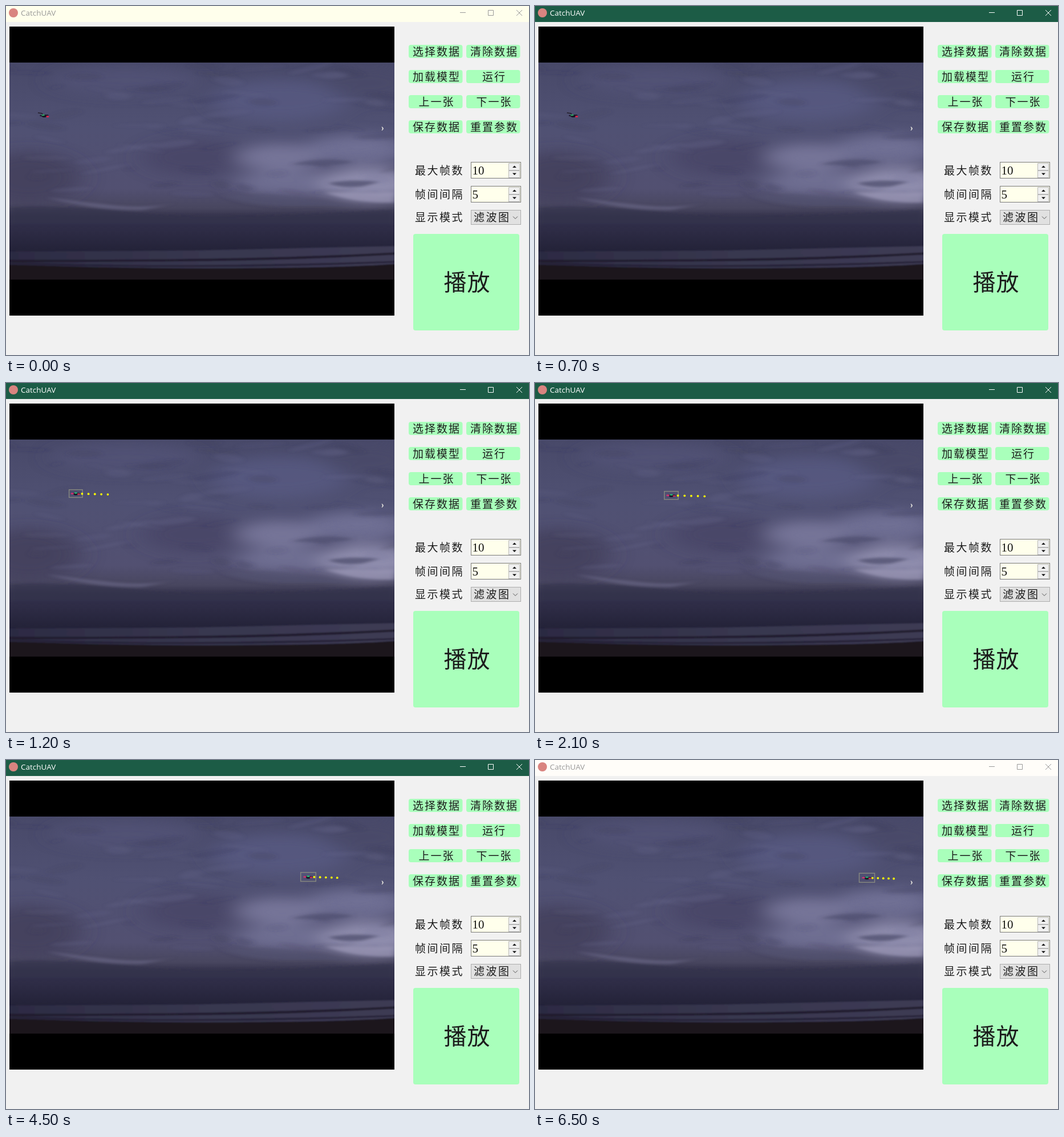
Write an HTML page that moves like this. It is 917 px wide and 611 px high and loops after 6.6 s.

```html
<!DOCTYPE html>
<html lang="zh-CN">
<head>
<meta charset="utf-8">
<title>CatchUAV</title>
<style>
html, body { margin: 0; width: 100%; height: 100%; overflow: hidden; background: #f1f1f1; }
svg { display: block; }
.cjk { font: 300 19px "Noto Sans CJK SC", "Noto Sans CJK", sans-serif; letter-spacing: 2px; fill: #1c1c1c; }
.label, .choice { letter-spacing: 2.5px; }
.mid { text-anchor: middle; }
.title { font: 13.5px "Open Sans", "Noto Sans", sans-serif; }
.num { font: 21px "Liberation Serif", serif; fill: #111; }
.play { font-size: 40px; letter-spacing: 1px; }
.btn { fill: #a9ffbb; }
</style>
</head>
<body>
<svg id="stage" width="917" height="611" viewBox="0 0 917 611">
  <defs>
    <linearGradient id="sky" x1="0" y1="0" x2="0" y2="1">
      <stop offset="0" stop-color="#484969"/>
      <stop offset=".3" stop-color="#505173"/>
      <stop offset=".58" stop-color="#525071"/>
      <stop offset=".67" stop-color="#48465f"/>
      <stop offset=".71" stop-color="#35334c"/>
      <stop offset=".76" stop-color="#2f2d47"/>
      <stop offset=".86" stop-color="#242339"/>
      <stop offset="1" stop-color="#242339"/>
    </linearGradient>
    <linearGradient id="sea" x1="0" y1="0" x2="1" y2="0">
      <stop offset="0" stop-color="#2c2b43"/>
      <stop offset=".5" stop-color="#38374f"/>
      <stop offset="1" stop-color="#3d3b54"/>
    </linearGradient>
    <filter id="soft" x="-50%" y="-50%" width="200%" height="200%"><feGaussianBlur stdDeviation="20 11"/></filter>
    <filter id="wisp" x="-50%" y="-50%" width="200%" height="200%"><feGaussianBlur stdDeviation="5 2"/></filter>
    <filter id="shore"><feGaussianBlur stdDeviation="1 .8"/></filter>
  </defs>

  <rect width="917" height="611" fill="#f1f1f1"/>
  <rect id="bar" width="917" height="28"/>
  <circle cx="13" cy="12" r="8" fill="#d98480"/>
  <text id="name" class="title" x="26" y="17">CatchUAV</text>
  <path id="controls" d="M796 11.5h10M845.5 7.5h9v9h-9zM895 7l10 10M905 7l-10 10" fill="none"/>

  <rect x="6" y="36" width="675" height="506"/>
  <svg x="6" y="99" width="675" height="380" viewBox="6 99 675 380">
    <rect x="6" y="99" width="675" height="380" fill="url(#sky)"/>
    <g filter="url(#soft)">
      <ellipse cx="40" cy="300" rx="90" ry="45" fill="#413f5b" opacity=".8"/>
      <ellipse cx="210" cy="130" rx="130" ry="24" fill="#55587c" opacity=".6"/>
      <ellipse cx="330" cy="265" rx="90" ry="32" fill="#464564" opacity=".7"/>
      <ellipse cx="480" cy="165" rx="120" ry="36" fill="#5b5d85" opacity=".7"/>
      <ellipse cx="635" cy="135" rx="80" ry="30" fill="#494a69" opacity=".7"/>
      <ellipse cx="480" cy="265" rx="75" ry="24" fill="#7d7c9f" opacity=".85"/>
      <ellipse cx="615" cy="250" rx="90" ry="24" fill="#74749a" opacity=".9"/>
      <ellipse cx="500" cy="310" rx="100" ry="22" fill="#77769a" opacity=".8"/>
      <ellipse cx="635" cy="312" rx="85" ry="30" fill="#8f8dad"/>
    </g>
    <g id="clouds" filter="url(#wisp)">
      <path d="M70 335q60 8 120 14t110-4l-60 12q-80 2-170-22z" fill="#6d6a8b" opacity=".6"/>
      <path d="M500 277q50-14 110-4q-40 10-110 4z" fill="#4e4d6d" opacity=".6"/>
      <path d="M565 310q40-8 90-2l-30 8q-40 4-60-6z" fill="#4b4a68" opacity=".7"/>
      <path d="M380 332q70-8 140 4l100 14h-140q-60-2-100-18z" fill="#545272" opacity=".6"/>
      <path d="M560 326q60 2 121 0v18q-70 2-121-18z" fill="#9a98b5" opacity=".7"/>
      <path d="M6 352q120-4 230 10t445-6v26H6z" fill="#35334c" opacity=".7"/>
    </g>
    <g filter="url(#shore)">
      <path d="M0 430L330 428 690 420V462H0z" fill="url(#sea)"/>
      <path d="M0 444Q250 445 420 441T690 431V435Q500 446 300 447T0 449z" fill="#201e2f"/>
      <path d="M0 448Q200 456 400 453T690 446V449Q500 457 320 457T0 453z" fill="#262437"/>
      <path d="M0 453Q200 460 400 459T690 451V490H0z" fill="#1a181f"/>
    </g>
    <path d="M659 211.500q5 3 0 6.500q2.500-3 0-6.500z" fill="#f4f2e8" stroke="#f4f2e8" stroke-width=".6"/>
  </svg>
  <g id="track"></g>

  <g id="panel"></g>
  <rect id="play" x="714" y="399" width="186" height="169" rx="4"/>
  <text class="cjk mid play" x="808.500" y="498">播放</text>
</svg>
<script>
const LOOP = 6600;
const STEPS = [800, 1200, 1600, 2100, 2600, 3100, 3500, 4000, 4500, 5000];
const $ = id => document.getElementById(id);
const rect = (x, y, w, h, attrs) => `<rect x="${x}" y="${y}" width="${w}" height="${h}" ${attrs}/>`;
const text = (cls, x, y, str) => `<text class="${cls}" x="${x}" y="${y}">${str}</text>`;
const oval = (x, y, rx, ry, fill, attrs = '') =>
  `<ellipse cx="${x}" cy="${y}" rx="${rx}" ry="${ry}" fill="${fill}" ${attrs}/>`;

function buildPanel() {
  const rows = [['选择数据', '清除数据'], ['加载模型', '运行'], ['上一张', '下一张'], ['保存数据', '重置参数']];
  let out = '';
  rows.forEach((row, r) => row.forEach((str, c) => {
    const x = 706 + c * 101, y = 68 + r * 44;
    out += rect(x, y, 94.5, 23, 'rx="4" class="btn"') + text('cjk mid', x + 49, y + 18.5, str);
  }));
  [['最大帧数', 10, 273], ['帧间间隔', 5, 315]].forEach(([str, num, y]) => {
    out += text('cjk label', 717, y + 21.5, str)
      + rect(815.5, y + .5, 87, 28, 'fill="#ffffec" stroke="#7a7a7a"')
      + text('num', 817.5, y + 22, num);
    [2, 15].forEach(dy => out += rect(881.5, y + dy + .5, 19, 12, 'fill="#f0f0f0" stroke="#b8b8b8"'));
    out += `<path d="M888 ${y + 10}h7l-3.500-3.500zM888 ${y + 19.500}h7l-3.500 3.500z" fill="#111"/>`;
  });
  return out + text('cjk label', 717, 376.5, '显示模式')
    + rect(815.5, 357.5, 87, 25, 'fill="#e1e1e1" stroke="#adadad"')
    + text('cjk choice', 820, 376.5, '滤波图')
    + '<path d="M889 368.500l4 4 4-4" fill="none" stroke="#555"/>';
}

// Seeded wisps roughen the sky.
function buildClouds() {
  let seed = 11, out = '';
  const rnd = () => (seed = seed * 16807 % 2147483647) / 2147483647;
  for (let i = 0; i < 70; i++) {
    const x = 6 + rnd() * 675, y = 105 + rnd() * 225;
    out += oval(x, y, 12 + rnd() * 34, 2 + rnd() * 5, i % 2 ? '#6b6b90' : '#3b3a57',
      `opacity="${.1 + rnd() * .14}" transform="rotate(${-14 + rnd() * 28} ${x} ${y})"`);
  }
  return out;
}

// Flight path; i counts detections and may be fractional.
function pathAt(i) {
  const u = i / 3;
  return [
    67 + 172 * u + 3.25 * u * (u - 1) - 3.417 * u * (u - 1) * (u - 2),
    192 + 1.58 * i
  ];
}

function drone(x, y, start) {
  const body = oval(x, y, 8, 1.6, '#1d1a2a') + oval(x, y + 1, 4, 2, '#171522');
  return start
    ? '<path d="M56 187l7 1 2 3 9 0" fill="none" stroke="#24202c" stroke-width="1.5"/>' + body
      + oval(x - 2, y - 1, 3, 1.3, '#2fa568') + oval(x + 6, y + 1.5, 2.6, 1.5, '#e82550')
    : body + oval(x, y - 1, 2.8, 1.3, '#28b575') + oval(x - 6, y, 2.8, 1.4, '#d83273')
      + oval(x + 5, y + 1, 2.6, 1.3, '#c92c50');
}

function trackAt(i) {
  const [x, y] = pathAt(Math.max(i, 0));
  let out = drone(x, y, i < 1);
  const dot = (px, py) => out += oval(px, py, 1.9, 1.9, '#ffff00');
  if (i === 0) {
    out += rect(54, 192, 26, 2, 'fill="#8d8078"');
    dot(67, 193);
  } else if (i > 0) {
    const w = 23 + i * .45, h = 13.2 + i * .3;
    out += rect(x - w / 2, y - h / 2, w, h, 'fill="none" stroke="#85877f" stroke-width="1.5"');
    for (let k = 1; k <= 5; k++) dot(...pathAt(i + k * .195));
  }
  return out;
}

function paint(t) {
  const active = t >= 600 && t < 6500;
  $('bar').setAttribute('fill', active ? '#1c5c46' : t < 600 ? '#ffffec' : '#fffdf9');
  $('name').setAttribute('fill', active ? '#fff' : '#999');
  $('controls').setAttribute('stroke', active ? '#fff' : '#999');
  $('play').setAttribute('fill', t >= 300 && t < 700 ? '#e6412f' : '#a9ffbb');
  const i = STEPS.filter(s => t >= s).length - 1;
  if (i !== shown) $('track').innerHTML = trackAt(shown = i);
}

let shown = null;
$('panel').innerHTML = buildPanel();
$('clouds').innerHTML = buildClouds() + $('clouds').innerHTML;

const start = performance.now();
function tick(now) {
  paint(Math.max(0, now - start) % LOOP);
  requestAnimationFrame(tick);
}
paint(0);
requestAnimationFrame(tick);
</script>
</body>
</html>
```
